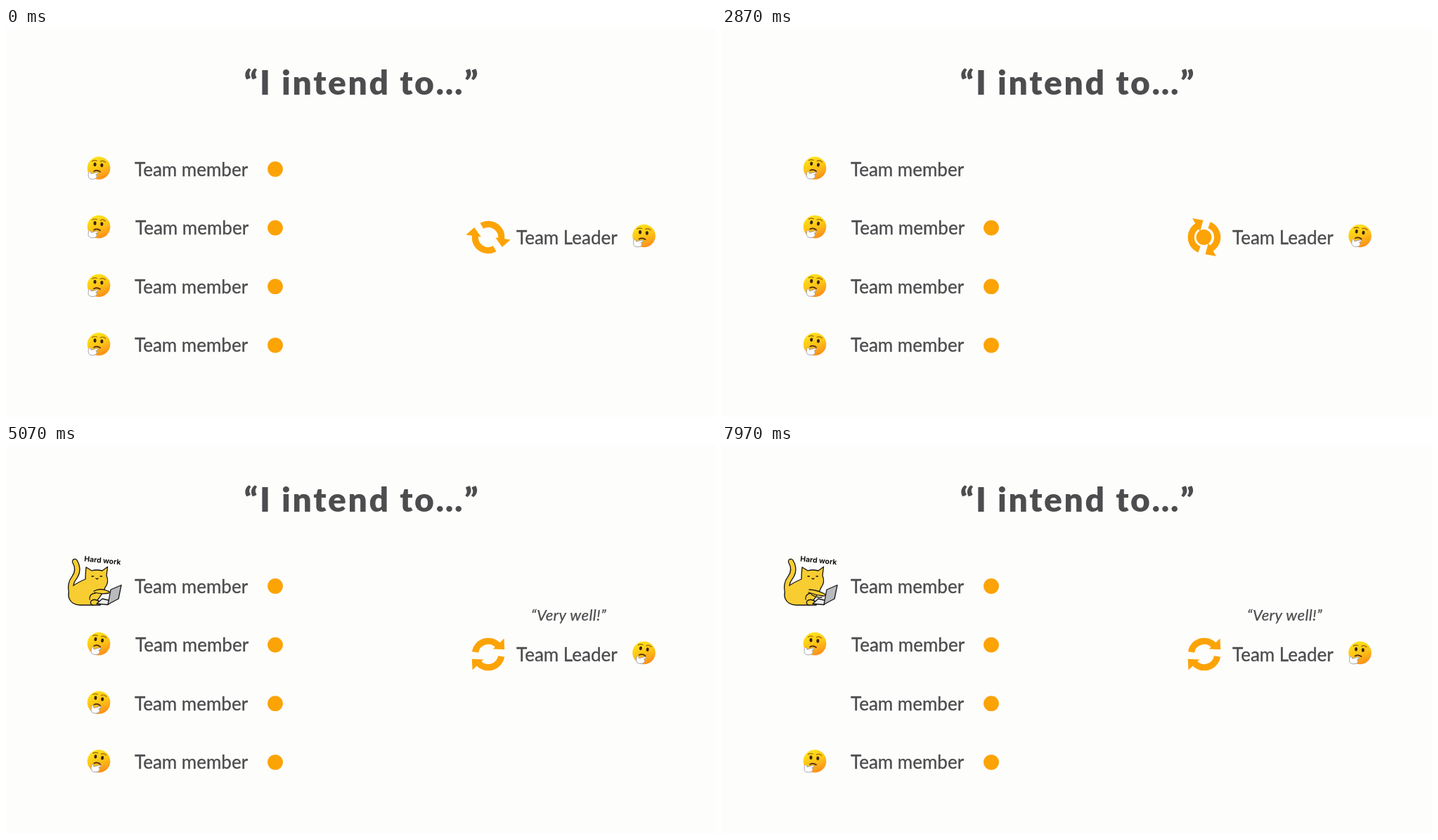
Animation, 1010 px wide and 554 px high, one loop 8000 ms. Source, as an HTML page:

```html
<!DOCTYPE html>
<html lang="en">
<head>
<meta charset="utf-8">
<title>I intend to</title>
<style>
  html, body { margin: 0; width: 100%; height: 100%; overflow: hidden; background: #fdfdfc; }
  svg { display: block; width: 1010px; height: 554px; }
  text { font-family: Lato, sans-serif; fill: #4d4d4f; }
  .title { font-size: 48px; font-weight: 900; letter-spacing: 2.6px; text-anchor: middle; }
  .label { font-size: 26px; stroke: #4d4d4f; stroke-width: .35px; }
  .reply { font-size: 22px; font-style: italic; letter-spacing: .4px; text-anchor: middle; stroke: #4d4d4f; stroke-width: .25px; }
  .work { font: 700 10.4px Inter, sans-serif; fill: #111; }
  .line { fill: none; stroke: #151515; stroke-width: 1.3px; stroke-linecap: round; stroke-linejoin: round; }
</style>
</head>
<body>
<svg viewBox="0 0 1010 554">
  <defs>
    <linearGradient id="skin" x1=".3" y1="0" x2=".7" y2="1">
      <stop offset="0" stop-color="#ffe51c"/>
      <stop offset=".5" stop-color="#fdc416"/>
      <stop offset="1" stop-color="#fb8a1a"/>
    </linearGradient>

    <g id="thinker">
      <circle r="16.3" fill="url(#skin)"/>
      <g id="face" fill="none" stroke-linecap="round">
        <ellipse cx="-5.5" cy="-5.2" rx="2" ry="2.8" fill="#3b2310"/>
        <ellipse cx="4.3" cy="-4" rx="2" ry="2.8" fill="#3b2310"/>
        <path d="M-9.5-9.6Q-6.5-11.8-2.8-10.4M2.2-9.3Q6-11.5 9.5-8.2" stroke="#a8700c" stroke-width="1.4"/>
        <path d="M-7 4.6Q-2.5 1.8 2 5.2" stroke="#4a2b10" stroke-width="1.7"/>
      </g>
      <path id="hand" d="M-14.5 6.2Q-13.4 3.8-11.6 6.2L-10.9 8.2L-3.4 6.2Q-.4 6-.9 8L-4.2 9.4Q-2 11-3 13Q-4.2 16-8.5 15.8Q-15.2 16-15 10.5Z"
        fill="#fff" stroke="#9a9aa6" stroke-width=".9" stroke-linejoin="round"/>
    </g>

    <g id="half">
      <path d="M-18.5-3A18.7 18.7 0 0 1 14-12.4" fill="none" stroke="#fca306" stroke-width="9.2"/>
      <path d="M22.5-22.5L23.2-6.8L6.8-7.6Z" fill="#fca306"/>
    </g>

    <g id="cat">
      <path d="M98 166Q105 178 97 189Q90 198 93 210" class="line" style="stroke-width:8.4px"/>
      <g fill="#f8cd32">
        <path class="line" style="fill:#f8cd32" d="M113 191Q101 196 92 203Q87 212 90 219Q94 228 106 228L134 228Q137 224 130 221Q138 211 141 203Q147 195 143 186L144.500 173.500L137 179Q128 177 122 179L114 174Q113 183 113 191Z"/>
        <path d="M98 166Q105 178 97 189Q90 198 93 210" fill="none" stroke="#f8cd32" stroke-width="5.800" stroke-linecap="round"/>
      </g>
      <path class="line" d="M122 187h2.500M134 187h2.500M128 190q1.500 1.500 3 0M119 220Q118 212 127 211M123 228Q119 226 121 222Q126 218 133 223"/>
      <path class="line" style="fill:#ececec" d="M129 226L137 219L150 222L145 227.500Z"/>
      <path class="line" style="fill:#b9babd" d="M149 206L164 199.500L160 219L145 227Z"/>
      <path id="arms" class="line" style="fill:#f8cd32"/>
      <text class="work" transform="translate(111 165.500) rotate(5.500)">Hard work</text>
    </g>
  </defs>

  <text class="title" x="506.500" y="95">“I intend to…”</text>
  <g id="team"></g>
  <text class="label" x="726" y="307.500">Team Leader</text>
  <use href="#thinker" x="907.500" y="296"/>
  <text class="reply" id="reply" x="800.500" y="250">“Very well!”</text>
  <g id="spinner"><use href="#half"/><use href="#half" transform="rotate(180)"/></g>
  <g id="dots" fill="#fca306"></g>
</svg>
<script>
const $ = id => document.getElementById(id);
const LOOP = 8000, PITCH = 83.6, HUB = { x: 685.5, y: 298 };
const clamp = v => Math.min(1, Math.max(0, v));
const ramp = (t, start, length) => clamp((t - start) / length);
const ease = u => (1 - Math.cos(Math.PI * u)) / 2;

// Trips to the leader and back; bend is the height of the curve's control point.
const trips = [
  { row: 0, out: 1480, back: 3700, bend: -39 },
  { row: 2, out: 5430, back: 7050, bend: 34 }
];

const rows = [0, 1, 2, 3].map(i => PITCH * i);
$('team').innerHTML = rows.map((y, i) =>
  `<use id="face${i}" href="#thinker" x="132" y="${199.5 + y}"/>
   <text class="label" x="${i === 1 ? 184 : 183}" y="${210.5 + y}">Team member</text>
   <use id="cat${i}" href="#cat" y="${y}" opacity="0"/>`).join('');
$('dots').innerHTML = rows.map((y, i) =>
  `<circle id="dot${i}" cx="383" cy="${201 + y}" r="10.9"/>`).join('');

function moveDot({ row, out, back, bend }, t) {
  const u = ease(ramp(t, out, 1000)) - ease(ramp(t, back, 700));
  const y = 201 + rows[row];
  const curve = (a, b, c) => (1 - u) ** 2 * a + 2 * u * (1 - u) * b + u * u * c;
  const dot = $('dot' + row);
  dot.setAttribute('cx', curve(383, 551, HUB.x));
  dot.setAttribute('cy', curve(y, y + bend, HUB.y));
  $('face' + row).setAttribute('opacity', 1 - ramp(t, back + 680, 200));
  $('cat' + row).setAttribute('opacity', ramp(t, back + 950, 200));
}

function draw(t) {
  trips.forEach(trip => moveDot(trip, t));
  $('reply').setAttribute('opacity', ramp(t, 2900, 300));

  // The icon turns in steps, seven to each half turn.
  const step = Math.floor(t < 2230 ? t / 170 - 12 : t / 213 - 9.05);
  $('spinner').setAttribute('transform', `translate(686 298) rotate(${step * 180 / 7})`);

  const lean = clamp(.5 + .7 * Math.cos(2 * Math.PI * (t - 1220) / 2000));
  $('hand').setAttribute('transform', `translate(${4 * lean} ${-.4 * lean})`);
  $('face').setAttribute('transform', `translate(${.5 * lean} ${-lean}) rotate(${4 * lean})`);

  const typing = Math.floor(t / 220) % 2;
  $('arms').setAttribute('d', typing
    ? 'M125 208Q135 203 145 208Q149 209 146 211Q136 213 126 210'
    : 'M124 206Q134 206 146 212Q149 215 144 215Q134 214 123 210M127 213Q135 218 142 217');
}

function tick() {
  draw(performance.now() % LOOP);
  requestAnimationFrame(tick);
}
tick();
</script>
</body>
</html>
```
